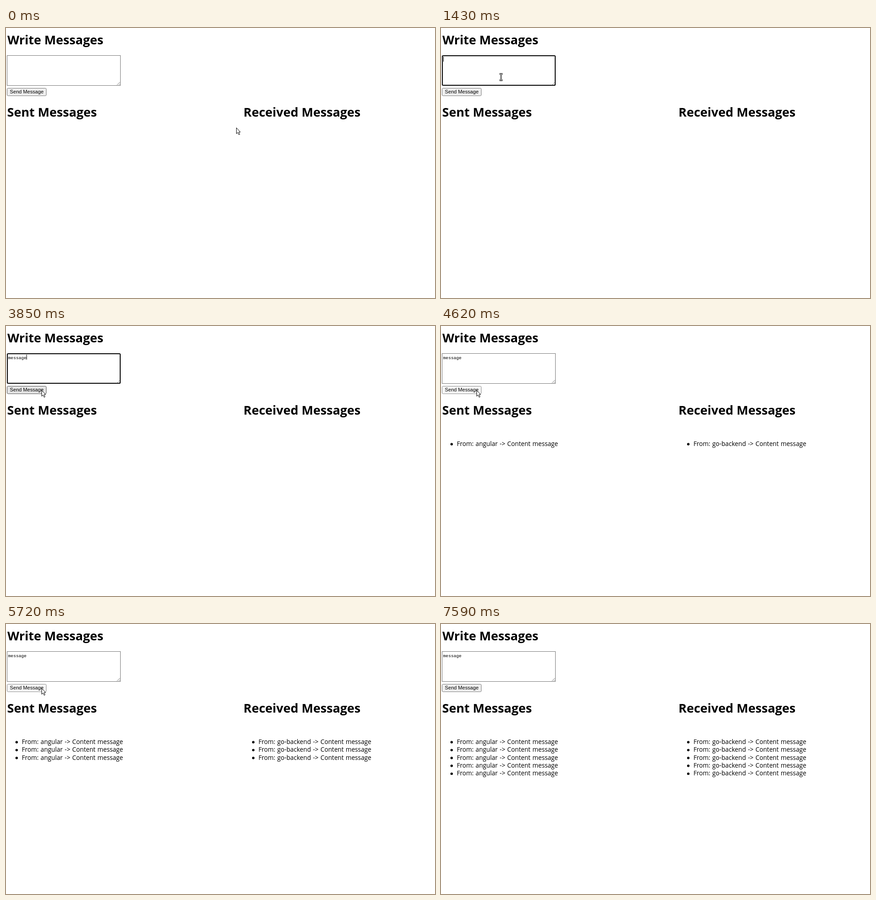
Recreate the animation shown at these times as an HTML page. Size 943x594 px, loop 8.58 s.

```html
<!DOCTYPE html>
<html lang="en">
<head>
<meta charset="utf-8">
<title>Messages</title>
<style>
  html, body { margin: 0; width: 100%; height: 100%; overflow: hidden; background: #fff; }
  svg { display: block; }
  .title { font: 700 27.1px "Open Sans", "Noto Sans", sans-serif; }
  .item { font: 13.7px "Open Sans", "Noto Sans", sans-serif; word-spacing: .8px; }
  .label { font: 11.1px "Liberation Sans", Arial, sans-serif; }
  .typed { font: 9.62px "Liberation Mono", monospace; }
  .box { fill: #fff; stroke: #767676; }
  .focused { stroke: #000; stroke-width: 2; }
  .button { fill: #efefef; stroke: #767676; }
  .hover { fill: #e5e5e5; stroke: #4f4f4f; }
  .pressed { fill: #f5f5f5; stroke: #8d8d8d; }
</style>
</head>
<body>
<svg width="943" height="594" viewBox="0 0 943 594">
  <g class="title">
    <text x="3" y="36">Write Messages</text>
    <text x="2.5" y="195">Sent Messages</text>
    <text x="522" y="195">Received Messages</text>
  </g>
  <rect id="box" class="box"/>
  <path d="M244 125.5 L250.5 119 M248 125.5 L250.5 123" stroke="#777" fill="none"/>
  <text id="typed" class="typed" x="4.6" y="73"></text>
  <rect id="caret" y="63" width="1" height="11"/>
  <rect id="button" x="2.5" y="132.5" width="86" height="16.5" rx="2"/>
  <text class="label" x="8.6" y="144">Send Message</text>
  <g id="list"></g>
  <path id="arrow" d="M.5 .5 V13.5 L3.4 10.8 L5.8 15.8 L7.9 14.9 L5.6 10 H9.2 Z" fill="#fff" stroke="#000"/>
  <g id="beam" fill="none">
    <path d="M-3.5 -7 H-1 L0 -6 L1 -7 H3.5 M0 -6 V6 M-3.5 7 H-1 L0 6 L1 7 H3.5" stroke="#000" stroke-width="2.8"/>
    <path d="M-3.5 -7 H-1 L0 -6 L1 -7 H3.5 M0 -6 V6 M-3.5 7 H-1 L0 6 L1 7 H3.5" stroke="#fff"/>
  </g>
</svg>
<script>
const LOOP = 8580, TICK = 110;
const WORD = 'message';
const FOCUS = 440, BLUR = 3960;

const typeTimes = [1980, 2420, 2530, 2640, 2750, 2860, 2970];
const pressTimes = [3960, 4620, 5170, 5720];
const sendTimes = [4070, 4730, 5280, 5830, 6270];
const caretOff = [[990, 1430], [1870, 1980], [3410, 3850]];

// time, x, y of the pointer tip
const route = [
  [110, 506, 219], [440, 132, 108],
  [3300, 132, 108], [3740, 78, 141],
  [6600, 78, 141], [6710, 112, 154], [6820, 212, 188], [6930, 335, 238],
  [7040, 420, 308], [7150, 398, 390], [7260, 312, 470],
  [7370, 200, 540], [7480, 90, 588], [7590, 60, 620]
];

const el = id => document.getElementById(id);
const show = (node, on) => node.setAttribute('visibility', on ? 'visible' : 'hidden');
const setAll = (node, attrs) => {
  for (const key in attrs) node.setAttribute(key, attrs[key]);
};
const countPast = (times, t) => times.filter(time => time <= t).length;
const within = (t, [start, end]) => t >= start && t < end;

function item(x, y, sender) {
  return `<circle cx="${x - 11.3}" cy="${y - 4}" r="2.7"/>` +
    `<text class="item" x="${x}" y="${y}">From: ${sender} -&gt; Content message</text>`;
}

const rows = sendTimes.map((_, i) => {
  const row = document.createElementNS('http://www.w3.org/2000/svg', 'g');
  const y = 264 + i * 17.35;
  row.innerHTML = item(34.7, y, 'angular') + item(554.9, y, 'go-backend');
  return el('list').appendChild(row);
});

function pointerAt(t) {
  const next = route.findIndex(key => key[0] > t);
  if (next === 0) return route[0].slice(1);
  if (next < 0) return route[route.length - 1].slice(1);
  const [t0, x0, y0] = route[next - 1], [t1, x1, y1] = route[next];
  const p = (t - t0) / (t1 - t0);
  return [Math.round(x0 + (x1 - x0) * p), Math.round(y0 + (y1 - y0) * p)];
}

function render(t) {
  const [x, y] = pointerAt(t);
  const overBox = x < 252 && y >= 60 && y < 127;
  const overButton = x < 89 && y >= 132 && y < 150;
  const focused = within(t, [FOCUS, BLUR]);
  const pressed = pressTimes.some(time => within(t, [time, time + TICK]));
  const letters = countPast(typeTimes, t);
  const sent = countPast(sendTimes, t);

  const inset = focused ? 1 : 0.5;
  setAll(el('box'), {
    x: 2 + inset, y: 60 + inset, width: 250 - 2 * inset, height: 67 - 2 * inset,
    rx: focused ? 1.5 : 0, class: focused ? 'box focused' : 'box'
  });
  el('typed').textContent = WORD.slice(0, letters);
  el('caret').setAttribute('x', 5 + Math.round(5.77 * letters));
  show(el('caret'), focused && !caretOff.some(span => within(t, span)));

  el('button').setAttribute('class',
    'button' + (pressed ? ' pressed' : overButton ? ' hover' : ''));
  rows.forEach((row, i) => show(row, i < sent));

  for (const id of ['arrow', 'beam']) {
    el(id).setAttribute('transform', `translate(${x} ${y})`);
    show(el(id), (id === 'beam') === overBox);
  }
}

const start = performance.now();
function loop() {
  const t = (performance.now() - start) % LOOP;
  render(Math.floor(t / TICK) * TICK);
  requestAnimationFrame(loop);
}
loop();
</script>
</body>
</html>
```
